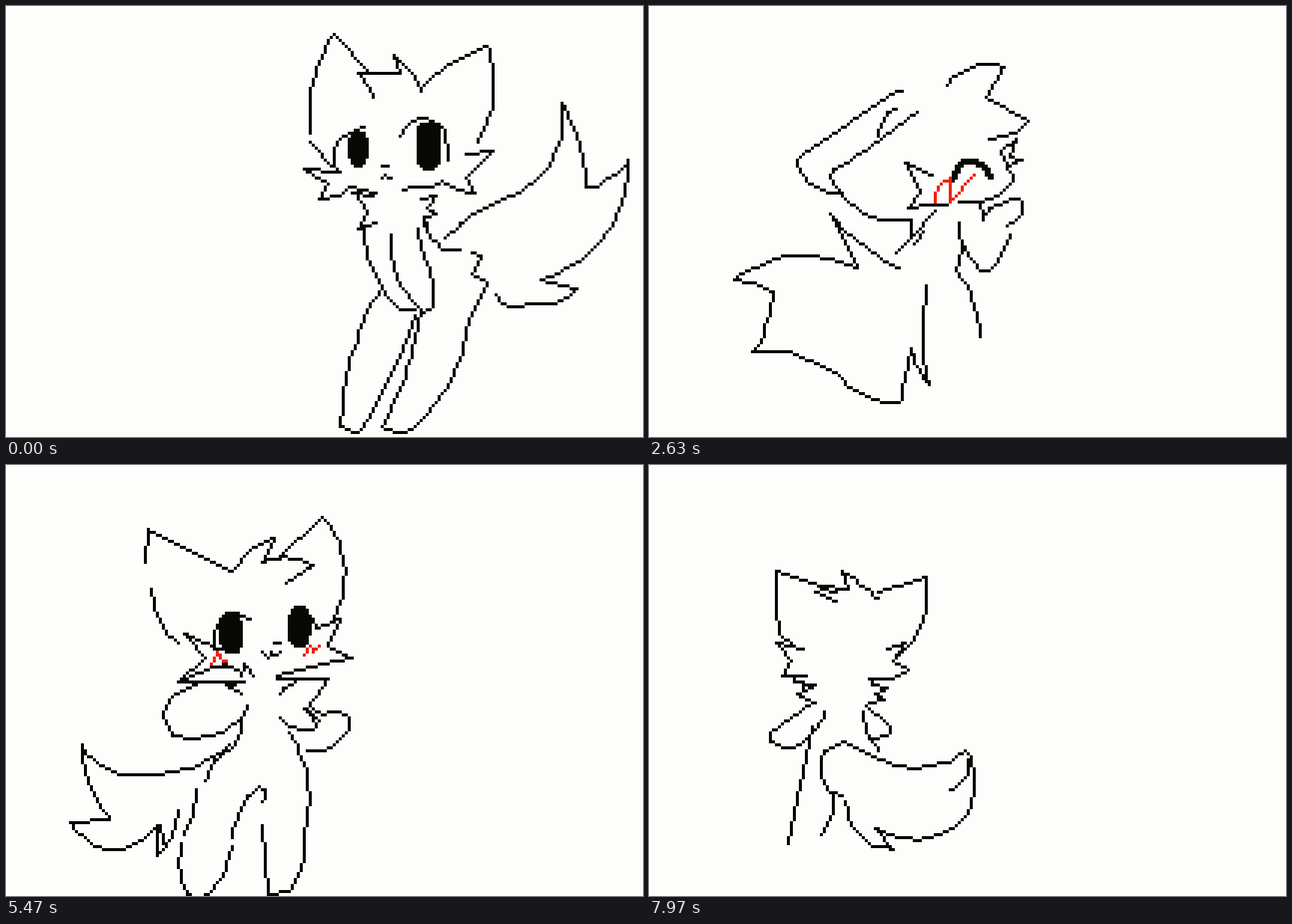
Write an HTML page with a canvas that moves like this. It is 850x576 px and loops after 8000 ms.

```html
<!DOCTYPE html>
<html lang="en">
<head>
<meta charset="utf-8">
<title>Dancing cat</title>
<style>
html, body { margin: 0; width: 100%; height: 100%; overflow: hidden; background: #fdfdfb; }
canvas { display: block; width: 852px; height: 576px; image-rendering: pixelated; }
</style>
</head>
<body>
<canvas id="stage" width="213" height="144"></canvas>
<script>
const ctx = document.getElementById('stage').getContext('2d');
const CELL = 4, LOOP = 8000, STEP = 100 / 3, TAU = Math.PI * 2;
const PAPER = '#fdfdfb', INK = '#080805', RED = '#f3200c';
let place = (x, y) => [x, y];
let pen = 1;

const cell = v => Math.floor(v / CELL);

function segment(ax, ay, bx, by) {
  const x = cell(ax), y = cell(ay), dx = cell(bx) - x, dy = cell(by) - y;
  const n = Math.max(Math.abs(dx), Math.abs(dy), 1);
  for (let i = 0; i <= n; i++) {
    ctx.fillRect(Math.round(x + dx * i / n), Math.round(y + dy * i / n), pen, pen);
  }
}

// Arc from A to B; bend is its height over its chord, to the left of travel.
function arc(ax, ay, bend, bx, by) {
  const cx = (ax + bx) / 2 + 2 * bend * (by - ay);
  const cy = (ay + by) / 2 - 2 * bend * (bx - ax);
  const n = bend ? Math.ceil(Math.hypot(bx - ax, by - ay) / 10) : 1;
  const at = u => {
    const v = 1 - u;
    return place(v * v * ax + 2 * u * v * cx + u * u * bx, v * v * ay + 2 * u * v * cy + u * u * by);
  };
  for (let i = 0; i < n; i++) segment(...at(i / n), ...at((i + 1) / n));
}

// Joined arcs: x, y, then bend, x, y for each.
function trail(x, y, ...rest) {
  for (let i = 0; i < rest.length; i += 3) {
    const [bend, nx, ny] = rest.slice(i, i + 3);
    arc(x, y, bend, nx, ny);
    [x, y] = [nx, ny];
  }
}

// Straight jagged line for fur and whiskers.
function zig(...p) {
  for (let i = 0; i < p.length - 2; i += 2) arc(p[i], p[i + 1], 0, p[i + 2], p[i + 3]);
}

function withPen(size, color, paint) {
  pen = size;
  ctx.fillStyle = color;
  paint();
  pen = 1;
  ctx.fillStyle = INK;
}

function pupil(cx, cy, rx, ry) {
  const [x, y] = place(cx, cy);
  for (let row = cell(y - ry); row <= cell(y + ry); row++) {
    const v = Math.abs(((row + 0.5) * CELL - y) / ry);
    if (v > 1) continue;
    const half = rx * Math.cbrt(1 - v ** 3);
    const left = Math.round((x - half) / CELL);
    ctx.fillRect(left, row, Math.round((x + half) / CELL) - left, 1);
  }
}

const standing = {
  at: 0, sway: 0.1, pivot: [620, 340],
  body() {
    trail(437, 39, -0.09, 406, 168);
    zig(437, 39, 481, 87);
    trail(468, 88, 0.05, 491, 122);
    trail(468, 90, 0, 526, 90, 0, 516, 66, 0.08, 554, 113);
    trail(554, 110, 0.06, 641, 53, 0.12, 630, 181);
    zig(406, 182, 432, 213);
    zig(447, 221, 397, 219, 430, 238, 418, 257);
    arc(418, 257, -0.12, 456, 243);
    zig(613, 198, 649, 195, 612, 230, 625, 250, 600, 247, 581, 233);

    trail(440, 222, 0.25, 478, 161);
    trail(524, 172, 0.28, 582, 162, 0.08, 588, 207);
    pupil(470, 191, 13, 25);
    pupil(564, 187, 17, 33);
    zig(500, 214, 508, 214);
    zig(500, 231, 506, 225, 513, 231);
    zig(461, 240, 495, 249);
    zig(461, 248, 490, 254);
    arc(530, 244, -0.05, 581, 235);

    zig(464, 248, 482, 272, 468, 297, 495, 290);
    zig(553, 258, 574, 253, 560, 268, 574, 278, 556, 283, 558, 292);
    trail(478, 297, -0.1, 520, 402, -0.1, 545, 404);
    arc(514, 304, -0.12, 552, 405);
    trail(550, 297, -0.03, 560, 345, 0.08, 570, 398, 0.2, 555, 408);
    trail(558, 285, -0.12, 587, 326, 0, 606, 327);
    zig(622, 329, 633, 333, 622, 357, 643, 370);
    trail(643, 370, -0.05, 615, 430, 0.1, 545, 560, 0.2, 503, 562, -0.04, 553, 410);
    trail(497, 380, -0.06, 447, 562, -0.3, 480, 555, 0, 525, 470, 0, 545, 415);
  },
  tail() {
    trail(586, 310, 0.06, 690, 246, -0.15, 741, 130, 0.06, 775, 243, -0.08, 831, 207, 0.17, 715, 365,
      0, 762, 379, 0.08, 710, 399, 0, 672, 400, 0.1, 655, 386);
  }
};

const wink = {
  at: 1033, sway: 0.07, pivot: [360, 352],
  body() {
    zig(230, 87, 255, 90, 347, 91, 408, 42, 401, 87, 529, 67);
    arc(529, 67, 0.11, 475, 197);
    arc(233, 87, -0.13, 287, 197);
    arc(448, 80, 0.2, 418, 117);
    zig(310, 211, 280, 216, 308, 234, 294, 254, 326, 236);
    zig(462, 178, 494, 165, 475, 197, 496, 212, 480, 220, 447, 216);

    withPen(2, INK, () => arc(315, 200, -0.36, 360, 200));
    pupil(422, 187, 16, 21);
    zig(407, 172, 440, 166, 468, 153);
    zig(454, 165, 454, 188);
    trail(369, 219, -0.5, 384, 222, -0.5, 402, 221);
    zig(396, 204, 407, 204);
    zig(340, 229, 362, 234);
    zig(340, 238, 377, 244);
    zig(415, 226, 445, 218);
    zig(418, 236, 447, 220);

    zig(342, 238, 363, 268, 345, 283, 378, 279);
    zig(447, 217, 436, 251, 461, 261, 422, 265);
    trail(378, 297, -0.04, 447, 384, -0.2, 468, 370, -0.07, 455, 289);
    zig(426, 288, 463, 374);
    trail(335, 328, 0.05, 355, 377, 0, 326, 399, 0, 354, 408);
    trail(347, 408, 0.05, 340, 465, -0.12, 373, 576);
    zig(430, 393, 408, 412, 404, 480, 401, 590);
    arc(411, 408, -0.06, 438, 576);
    zig(462, 423, 472, 590);
  },
  tail() {
    trail(372, 362, -0.17, 213, 291, -0.1, 155, 347, 0, 206, 349, -0.05, 190, 427, 0.2, 228, 411,
      0.05, 258, 454, 0, 258, 412, 0.32, 306, 410);
  }
};

const giggle = {
  at: 2633, sway: 0.12, period: 2200 / 3, pivot: [350, 362],
  body() {
    trail(339, 112, 0, 328, 112, 0, 205, 196, -0.3, 205, 225, -0.12, 252, 249);
    trail(357, 140, 0.03, 245, 219, -0.15, 252, 245, -0.1, 320, 287, 0, 350, 287, 0, 350, 308, 0, 382, 275);
    zig(328, 330, 352, 306);
    zig(355, 318, 365, 302);
    arc(328, 136, -0.15, 305, 175);
    trail(397, 104, 0.16, 473, 82, 0, 449, 122, 0, 505, 154, 0, 488, 170, 0, 454, 178);

    zig(490, 177, 470, 192, 478, 213);
    zig(490, 178, 482, 203, 497, 207, 478, 214);
    trail(478, 218, 0.35, 478, 242, 0.1, 414, 263);
    zig(378, 227, 342, 211, 362, 250, 346, 268, 372, 266);
    zig(376, 267, 398, 267);
    withPen(2, INK, () => arc(400, 228, 0.4, 455, 224));
    withPen(1, RED, () => trail(380, 262, 0.1, 400, 229, 0, 401, 262, 0, 432, 226));

    zig(440, 262, 447, 284);
    trail(448, 276, 0.08, 492, 258, 0.2, 493, 282, 0, 477, 294);
    trail(412, 290, -0.12, 447, 355, 0, 455, 353, -0.05, 480, 307);
    trail(418, 322, 0, 411, 352, 0.05, 443, 440);
  },
  tail() {
    trail(335, 350, 0.06, 243, 279, 0, 276, 350, -0.15, 113, 366, 0.05, 167, 382, 0.05, 140, 462,
      0.1, 250, 492, -0.08, 322, 530, -0.3, 338, 515, 0, 350, 460, -0.05, 373, 505, 0.06, 372, 375);
  },
  lowTail() {
    trail(336, 361, 0.14, 175, 407, -0.06, 271, 458, -0.13, 290, 576, 0.1, 348, 523, -0.09, 433, 572,
      0.1, 372, 415, -0.22, 428, 467, 0, 428, 460, 0.05, 361, 365);
  }
};

const hug = {
  at: 4733, sway: 0.12, pivot: [295, 380],
  body() {
    trail(186, 132, 0, 190, 87, 0, 305, 142, 0.1, 358, 97, 0, 344, 129, 0.1, 413, 134, 0, 374, 158);
    trail(365, 125, 0, 425, 69, 0.15, 440, 205);
    arc(196, 165, -0.12, 230, 238);
    zig(286, 246, 240, 226, 267, 260, 233, 292, 318, 291);
    arc(233, 292, 0.08, 295, 270);
    zig(292, 268, 312, 275);
    zig(316, 282, 318, 265, 333, 282);
    zig(415, 219, 446, 208, 432, 243, 462, 260, 440, 264, 362, 282);

    trail(280, 245, 0.12, 295, 200, 0.15, 328, 208);
    arc(380, 205, 0.4, 415, 219);
    pupil(302, 226, 15, 28);
    pupil(393, 217, 15, 28);
    zig(359, 237, 369, 237);
    trail(345, 252, -0.5, 356, 252, -0.5, 367, 250);
    withPen(1, RED, () => {
      zig(274, 265, 285, 252, 288, 260, 296, 261);
      zig(398, 255, 408, 242, 412, 250, 419, 241);
    });

    zig(362, 287, 431, 288, 403, 325, 417, 350);
    trail(417, 350, 0.1, 395, 354, 0.1, 368, 340);
    arc(388, 290, -0.15, 368, 307);
    zig(320, 291, 295, 296, 317, 306);
    trail(255, 296, -0.2, 213, 335, -0.25, 245, 365, -0.15, 325, 324);
    trail(316, 337, 0.15, 295, 383, -0.12, 268, 424);
    zig(400, 325, 418, 342);
    trail(408, 322, 0, 425, 335, 0.15, 455, 333, 0.1, 458, 350, 0.2, 404, 383);
    trail(380, 357, 0.1, 401, 490, 0.08, 380, 572, 0, 350, 573, 0, 342, 482);
    arc(255, 436, 0.05, 241, 493);
    trail(237, 508, -0.12, 245, 575, 0, 260, 578);
    arc(268, 576, -0.08, 302, 512);
    trail(303, 497, 0.1, 338, 430, 0.3, 344, 452);
  },
  tail() {
    trail(300, 375, 0.1, 175, 407, 0.15, 104, 365, -0.1, 135, 464, 0, 82, 466, -0.3, 197, 477,
      0, 194, 517, 0, 215, 493, 0, 228, 460);
    zig(201, 476, 205, 500);
  }
};

const sideways = {
  at: 6167, sway: 0.1, pivot: [340, 385],
  body() {
    trail(234, 150, -0.08, 190, 131, -0.1, 205, 235);
    trail(268, 158, 0, 244, 123, 0.08, 303, 168, 0.06, 385, 152, 0.14, 345, 241);
    trail(268, 158, -0.1, 203, 181, 0, 240, 191);
    zig(345, 240, 372, 242, 340, 262, 360, 270);
    arc(360, 270, 0.12, 320, 284);
    zig(295, 281, 318, 279, 316, 285);

    trail(204, 235, -0.15, 205, 263, -0.08, 248, 285);
    arc(208, 235, 0.35, 240, 212);
    trail(268, 240, 0.15, 297, 215, 0.2, 312, 216);
    pupil(232, 225, 9, 20);
    pupil(310, 236, 10, 20);
    trail(233, 258, -0.4, 250, 260, -0.5, 262, 252);

    zig(235, 280, 212, 276, 230, 303, 214, 333, 258, 318);
    zig(304, 295, 334, 297, 312, 310, 316, 323, 293, 314);
    trail(230, 297, -0.08, 166, 340, 0, 170, 347, 0, 200, 345);
    trail(245, 326, -0.1, 213, 375, 0, 213, 389, 0, 235, 389, -0.05, 266, 358);
    zig(212, 389, 193, 381, 208, 413, 185, 432, 210, 440);
    arc(210, 440, -0.06, 227, 520);
    zig(260, 515, 266, 424, 293, 510);
    trail(297, 317, -0.08, 318, 372, 0.1, 338, 455, 0, 335, 510);
  },
  tail() {
    trail(324, 370, 0.2, 385, 335, 0, 450, 341, -0.12, 499, 268, 0.06, 517, 328, -0.1, 560, 298,
      0.22, 450, 394, -0.05, 511, 414, 0.05, 460, 433, 0, 405, 433, 0.1, 368, 406);
  }
};

const back = {
  at: 7967, sway: 0.08, pivot: [250, 415],
  body() {
    trail(171, 142, 0, 230, 163, 0, 265, 167, 0, 258, 142, 0.04, 305, 180);
    trail(305, 172, 0, 371, 152, 0.14, 325, 262);
    trail(171, 142, -0.04, 175, 225, 0, 190, 240);
    zig(222, 170, 250, 184);
    zig(230, 165, 250, 172);
    zig(207, 246, 170, 240, 192, 263, 178, 282, 210, 284);
    zig(320, 245, 344, 239, 325, 264, 345, 274, 322, 285, 297, 286);

    zig(195, 289, 222, 296, 200, 306, 210, 314, 222, 317);
    zig(195, 287, 210, 295, 204, 306);
    zig(295, 288, 300, 295, 320, 297, 302, 306, 316, 316, 295, 320);
    trail(218, 317, 0, 163, 358, 0, 163, 372, -0.15, 208, 369, -0.08, 236, 330);
    zig(218, 350, 186, 506);
    trail(290, 324, 0, 320, 345, 0.3, 313, 364, 0, 300, 366);
    arc(287, 330, -0.12, 307, 382);
    arc(247, 443, 0.08, 230, 496);
  },
  tail() {
    trail(257, 442, 0.2, 229, 405, 0.25, 262, 371, 0.05, 310, 395, -0.14, 424, 381, 0.12, 425, 465,
      0.15, 335, 498, 0, 300, 486, 0, 326, 513, 0.22, 263, 450);
    arc(426, 395, 0.2, 402, 435);
  }
};

const scenes = [
  [0, standing], [430, wink], [2030, giggle], [4430, hug], [5930, sideways], [7030, back]
];

function render(t) {
  const pose = scenes.filter(([start]) => start <= t).pop()[1];
  const phase = (t - pose.at) / (pose.period || 800) * TAU;
  const c = Math.cos(phase), s = Math.sin(phase);
  const twoTails = Boolean(pose.lowTail);
  const dx = twoTails ? 5 * (1 - c) : 3 * s;
  const dy = twoTails ? 2.2 * (1 - c) : -4 * (1 - c);
  const [px, py] = pose.pivot;
  const ca = Math.cos(pose.sway * s), sa = Math.sin(pose.sway * s);
  const move = (x, y) => [x + dx, y + dy];
  const turn = (x, y) => [px + (x - px) * ca - (y - py) * sa, py + (x - px) * sa + (y - py) * ca];

  ctx.fillStyle = PAPER;
  ctx.fillRect(0, 0, 213, 144);
  ctx.fillStyle = INK;
  place = twoTails ? turn : (x, y) => move(...turn(x, y));
  if (twoTails && c < 0) pose.lowTail();
  else pose.tail();
  place = move;
  pose.body();
}

const begin = performance.now();
function tick() {
  const t = (performance.now() - begin) % LOOP;
  render(Math.floor((t + 5) / STEP) * STEP);
  requestAnimationFrame(tick);
}
tick();
</script>
</body>
</html>
```
